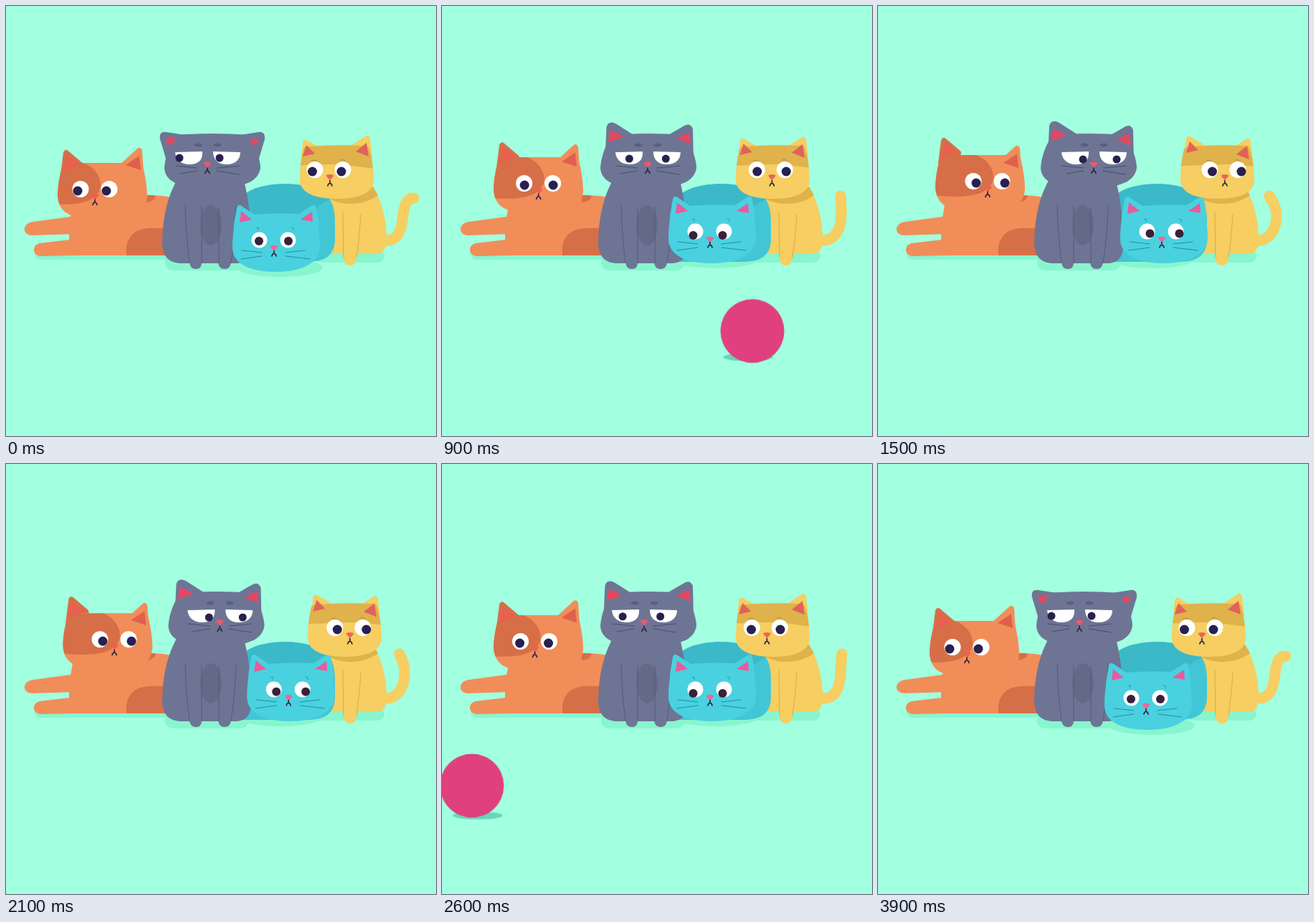
These frames come from a looping animation (600x600 px, 4100 ms). An HTML page:

```html
<!DOCTYPE html>
<html lang="en">
<head>
<meta charset="utf-8">
<title>Cats watching a ball</title>
<style>
@property --up { syntax: "<number>"; inherits: true; initial-value: 0; }
@property --lean { syntax: "<number>"; inherits: true; initial-value: 0; }
@property --look { syntax: "<number>"; inherits: true; initial-value: 0; }
@property --gaze { syntax: "<number>"; inherits: true; initial-value: 0; }

html, body { margin: 0; width: 100%; height: 100%; overflow: hidden; background: #a2ffe0; }
svg { display: block; width: 100vw; height: 100vh; }

/* Every animation is scrubbed by --t, in 100 ms ticks */
svg, .fold, .tail, .ball, .ball-shade {
  animation: 4.1s linear calc(var(--t, 0) * -1ms) infinite paused;
}
svg { animation-name: up, lean, look, gaze; animation-timing-function: ease-in-out, linear, linear, linear; }
.fold { animation-name: fold; animation-timing-function: ease-in-out; d: var(--down); }
.tail { animation-name: tail; fill: none; stroke: #f6ce61; stroke-width: 15; stroke-linecap: round; }
.ball { animation-name: roll; fill: #e0407e; }
.ball-shade { animation-name: roll-shade; fill: #66d8ba; }

@keyframes up {
  0%, 2.44% { --up: 0; }
  14.63%, 80.49% { --up: 1; }
  95.12%, 100% { --up: 0; }
}
@keyframes fold {
  0%, 2.44% { d: var(--down); }
  14.63%, 80.49% { d: var(--raised); }
  95.12%, 100% { d: var(--down); }
}
@keyframes lean {
  0%, 21.95% { --lean: 0; animation-timing-function: ease-in-out; }
  34.15%, 46.34% { --lean: 1; }
  51.22% { --lean: .92; }
  61%, 100% { --lean: 0; }
}
@keyframes look {
  0%, 14.63% { --look: 0; }
  21.95% { --look: .42; animation-timing-function: ease-out; }
  34.15%, 43.9% { --look: 1; }
  51.22% { --look: .84; }
  63.41% { --look: .07; animation-timing-function: ease-out; }
  70.73%, 100% { --look: 0; }
}
@keyframes gaze {
  0%, 14.63% { --gaze: 0; }
  21.95% { --gaze: .56; animation-timing-function: ease-out; }
  31.71%, 51.22% { --gaze: 1; }
  63.41% { --gaze: .38; animation-timing-function: ease-out; }
  73.17%, 100% { --gaze: 0; }
}
@keyframes tail {
  0%, 9.76%, 95.12%, 100% { d: path("M525 327C548 330 552 312 554 292C556 275 560 268 569 268"); }
  21.95% { d: path("M525 327C545 330 557 315 557 292C558 278 556 270 556 265"); }
  36.59%, 41.46% { d: path("M525 327C545 330 556 313 556 292C556 280 550 272 546 265"); }
  51.22% { d: path("M525 327C545 330 556 313 556 292C557 280 552 272 549 265"); }
  63.41% { d: path("M525 327C548 330 555 315 556 292C557 280 557 272 558 265"); }
  78.05% { d: path("M525 327C548 330 552 313 555 292C557 278 560 268 567 264"); }
}
@keyframes roll {
  0% { transform: translate(-202px, 444px); }
  12.2% { transform: translate(-147px, 444px); }
  21.95% { transform: translate(433px, 453.5px); }
  26.83% { transform: translate(723px, 461px); }
  56.1% { transform: translate(774px, 456px); }
  65.85%, 100% { transform: translate(-202px, 446.5px); }
}
@keyframes roll-shade {
  0% { transform: translate(-210px, 490px); }
  12.2% { transform: translate(-155px, 490px); }
  21.95% { transform: translate(427px, 490px); }
  26.83% { transform: translate(715px, 494px); }
  56.1% { transform: translate(782px, 492px); }
  65.85%, 100% { transform: translate(-194px, 490px); }
}

/* Per-cat travel: lean moves the head, look and gaze slide the face on it */
.head { transform: translate(calc(var(--lean) * var(--hx)), calc(var(--up) * var(--hy) + var(--lean) * var(--ly))); }
.face { transform: translateX(calc(var(--look) * var(--fx) + var(--gaze) * var(--fg, 0px))); }
.ear-l { transform: translate(calc(var(--look) * var(--lx)), calc(var(--look) * var(--lift))); }
.ear-r { transform: translateY(calc(var(--look) * var(--drop))); }
.pupil { transform: translate(calc(var(--gaze) * var(--gx)), calc(var(--gaze) * var(--gy, 0px))); }
.duck { transform: translateY(calc(var(--up) * -12px)); }

.orange { --hx: 8px; --hy: -8px; --ly: -3px; --fx: 8px; --fg: 13px; --gx: 8px; --lx: 0px; --lift: -6px; --drop: 8px; fill: #f18d59; }
.grey { --hx: 6px; --hy: 0px; --ly: 0px; --fx: 14px; --gy: 2px; --lx: 6px; --lift: -3px; --drop: 3px; fill: #6e7594; }
.teal { --hx: 22px; --hy: -12px; --ly: 0px; fill: #49d1df; }
.yellow { --hx: 12px; --hy: 0px; --ly: 0px; --fx: 20px; --gx: 7px; --lx: 4px; --lift: -5px; --drop: 4px; fill: #f6ce61; }
.teal .pupil { transform: translate(calc(var(--up) * -2.5px + var(--lean) * 7px), calc(var(--up) * 4px - var(--lean) * 2.5px)); }

.tip { stroke-width: 8; stroke-linejoin: round; }
.white { fill: #fff; }
.pupil { fill: #28204f; }
.line { fill: none; stroke-width: 1; stroke-linecap: round; }
.mouth { fill: none; stroke: #33203f; stroke-width: 1.7; stroke-linecap: round; stroke-linejoin: round; }
</style>
</head>
<body>
<svg viewBox="0 0 600 600">
  <defs>
    <path id="mouth" class="mouth" d="M0 0V4M-3 7.500Q-2.500 4 0 4Q2.500 4 3 7.500"/>
    <path id="nose" d="M-5 -3Q0 -5 5 -3Q6 -2 1 3Q0 4 -1 3Q-6 -2 -5 -3Z"/>
    <path id="orange-head" d="M79 223Q82 219 90 219H184Q190 219 191 224C195 240 197 255 197 266C196 284 186 293 165 293H100C82 293 72 280 72 262C73 245 76 232 79 223Z"/>
    <path id="yellow-head" d="M415 200Q416 196 424 196Q460 193 500 195Q506 195 507 200C512 217 513 235 513 245C511 262 490 269 462 269C430 269 411 260 410 244C410 228 412 212 415 200Z"/>
    <clipPath id="orange-clip"><use href="#orange-head"/></clipPath>
    <clipPath id="yellow-clip"><use href="#yellow-head"/></clipPath>
  </defs>

  <rect width="600" height="600" fill="#a2ffe0"/>
  <g fill="#88f5cf">
    <rect x="40" y="338" width="200" height="16" rx="8"/>
    <rect x="222" y="348" width="116" height="21" rx="10"/>
    <ellipse class="duck" cx="382" cy="365" rx="60" ry="13"/>
    <rect x="430" y="340" width="98" height="18" rx="9"/>
  </g>

  <!-- lying cat -->
  <g class="orange">
    <path d="M98 293L38 301C22 303 22 320 37 320L98 318Z"/>
    <path d="M98 325L47 331C35 334 37 349 49 349L98 348Z"/>
    <path d="M95 265H196Q212 263 232 267V348H88V318C87 312 87 304 91 290Z"/>
    <path d="M195 264Q203 263 209 265Q207 273 195 274Z" fill="#d66f47"/>
    <path d="M168 348V337C170 319 183 310 202 310H232V348Z" fill="#d66f47"/>
    <g class="head">
      <path class="tip ear-l" d="M84 205L80 236L104 222Z" fill="#d66f47" stroke="#d66f47"/>
      <path class="tip ear-r" d="M186 202L188 232L163 223Z" stroke="#f18d59"/>
      <use href="#orange-head"/>
      <g clip-path="url(#orange-clip)">
        <path class="face" d="M20 190H100L108 219C128 226 136 246 130 258C122 274 100 283 20 272Z" fill="#d66f47"/>
      </g>
      <path class="ear-l" d="M85 208L103 221L79 231Z" fill="#e8604f"/>
      <path class="ear-r" d="M186 209L188 229L167 222Z" fill="#df604e"/>
      <g class="face">
        <g class="white"><circle cx="104" cy="255.500" r="11.500"/><circle cx="144" cy="255.500" r="11.500"/></g>
        <g class="pupil"><circle cx="100" cy="258" r="6.500"/><circle cx="140" cy="258" r="6.500"/></g>
        <use href="#nose" x="124.500" y="266" fill="#f0604f"/>
        <use href="#mouth" x="124" y="270"/>
      </g>
    </g>
  </g>

  <!-- sitting cat, body -->
  <g class="yellow">
    <path class="tail" d="M525 327C548 330 552 312 554 292C556 275 560 268 569 268"/>
    <path d="M443 258C452 275 455 330 453 346H517C529 346 532 335 531 320C530 292 523 272 513 253Z"/>
    <path d="M440 258C446 274 490 286 519 264L512 252Z" fill="#dfb24c"/>
    <path d="M470 320L471 352Q472 362 480 362Q488 362 489 352L493 320Z"/>
    <path class="line" d="M470 288L471 351M495 291Q493 325 489 351" stroke="#d9ab48"/>
  </g>

  <!-- curled cat, body -->
  <path d="M330 265C350 246 400 245 425 253C450 258 459 275 459 300V325C459 348 445 357 420 357H330Z" fill="#42c6d6"/>
  <path d="M330 265C350 246 400 245 425 253C440 256 448 262 452 270Q436 276 424 292H330Z" fill="#3bb9c8"/>

  <!-- grumpy cat -->
  <g class="grey">
    <path d="M240 240C227 262 218 292 218 333C219 350 228 359 245 359H320C335 359 342 350 342 335C343 300 338 266 331 240Z"/>
    <ellipse cx="286" cy="306" rx="15" ry="28" fill="#626a87"/>
    <path d="M254 335L256 358Q257 367 265 367Q273 367 273 358V335ZM296 335V358Q297 367 305 367Q313 367 314 358L316 335Z"/>
    <path class="line" d="M250 279Q251 320 256 358M273 281V358M297 281V358M321 279Q320 320 314 358" stroke="#555b7a"/>
    <g class="head">
      <g class="ear-l">
        <path class="fold" style='--down: path("M224 216L215 186Q213 174 224 176L262 182Z"); --raised: path("M225 214L227 170Q230 160 241 166L266 182Z")'/>
      </g>
      <g class="ear-r">
        <path class="fold" style='--down: path("M352 216L361 186Q362 174 352 176L314 182Z"); --raised: path("M351 214L350 170Q346 160 336 167L310 182Z")'/>
      </g>
      <path d="M238 180Q288 176 339 180C346 190 355 213 355 226C352 244 335 251 310 252H265C240 252 222 244 221 226C222 208 230 190 238 180Z"/>
      <g class="ear-l">
        <path class="fold" fill="#e5475f" style='--down: path("M222 185L239 183L229 196Z"); --raised: path("M233 174L251 184L229 191Z")'/>
      </g>
      <g class="ear-r">
        <path class="fold" fill="#e5475f" style='--down: path("M354 185L339 186L347 196Z"); --raised: path("M344 175L327 184L347 191Z")'/>
      </g>
      <g class="face">
        <g fill="#5a5f80">
          <ellipse cx="268" cy="194" rx="5.500" ry="2.600"/><ellipse cx="295" cy="194" rx="5.500" ry="2.600"/>
        </g>
        <path class="white" d="M236 204L274 203C275 215 268 221 256 221C244 221 237 214 236 204ZM289 203L327 204C327 214 320 221 308 221C296 221 289 215 289 203Z"/>
        <circle class="pupil" style="--gx: 24px" cx="242" cy="212" r="5.500"/>
        <circle class="pupil" style="--gx: 15px" cx="298" cy="212" r="5.500"/>
        <path class="line" d="M237 223L267 226M243 234L267 230M294 226L326 223M294 230L325 235" stroke="#484c6e"/>
        <use href="#nose" x="281" y="221.500" fill="#f0566c"/>
        <use href="#mouth" x="281" y="226"/>
      </g>
    </g>
  </g>

  <!-- curled cat, head -->
  <g class="teal head">
    <path class="tip" d="M326 282L322 306L344 294ZM429 282L433 306L410 294Z" stroke="#49d1df"/>
    <path d="M321 297C330 288 424 287 433 295C437 310 438 328 438 338C436 360 410 371 377 371C340 371 317 360 316 338C316 320 318 306 321 297Z"/>
    <path d="M328 286L343 298L326 302ZM427 287L411 298L428 301Z" fill="#ea5a9c"/>
    <g class="white"><circle cx="353.500" cy="326.500" r="11"/><circle cx="393.500" cy="326.500" r="11"/></g>
    <g class="pupil" style="fill: #38213a"><circle cx="353" cy="328" r="6"/><circle cx="394" cy="328" r="6"/></g>
    <path class="line" d="M349 310L352 309V313M398 309L401 310V313" stroke="#3a93ae"/>
    <path class="line" d="M329 341L357 344M328 353L357 349M390 344L417 341M390 349L424 353" stroke="#2d88a0"/>
    <use href="#nose" x="374" y="338" fill="#f0649c"/>
    <use href="#mouth" x="374" y="341.500"/>
  </g>

  <!-- sitting cat, head -->
  <g class="yellow head">
    <path class="tip ear-l" d="M418 191L416 212L434 200Z" stroke="#f6ce61"/>
    <path class="tip ear-r" d="M504 185L507 211L482 199Z" stroke="#f6ce61"/>
    <use href="#yellow-head"/>
    <g clip-path="url(#yellow-clip)">
      <path class="face" d="M370 180H550V229C510 229 490 222 462 221C440 221 425 222 370 224Z" fill="#dfb24c"/>
    </g>
    <path class="ear-l" d="M419 194L431 206L414 210Z" fill="#e0625a"/>
    <path class="ear-r" d="M503 191L506 210L488 203Z" fill="#e0625a"/>
    <g class="face">
      <path class="line" d="M426 216L432 215L434 217M466 215L470 214L474 217" stroke="#b98d3d"/>
      <g class="white"><circle cx="431" cy="228.500" r="11.500"/><circle cx="470" cy="228.500" r="11.500"/></g>
      <g class="pupil"><circle cx="427.500" cy="231" r="6.500"/><circle cx="468" cy="231" r="6.500"/></g>
      <use href="#nose" x="452" y="239" fill="#ec6659"/>
      <use href="#mouth" x="452" y="243.500"/>
    </g>
  </g>

  <ellipse class="ball-shade" rx="35" ry="5.500"/>
  <circle class="ball" r="44.500"/>
</svg>
<script>
const LOOP = 4100, TICK = 100;
const start = performance.now();

function draw() {
  const t = Math.floor((performance.now() - start) / TICK) * TICK % LOOP;
  document.documentElement.style.setProperty("--t", t);
  requestAnimationFrame(draw);
}
draw();
</script>
</body>
</html>
```
